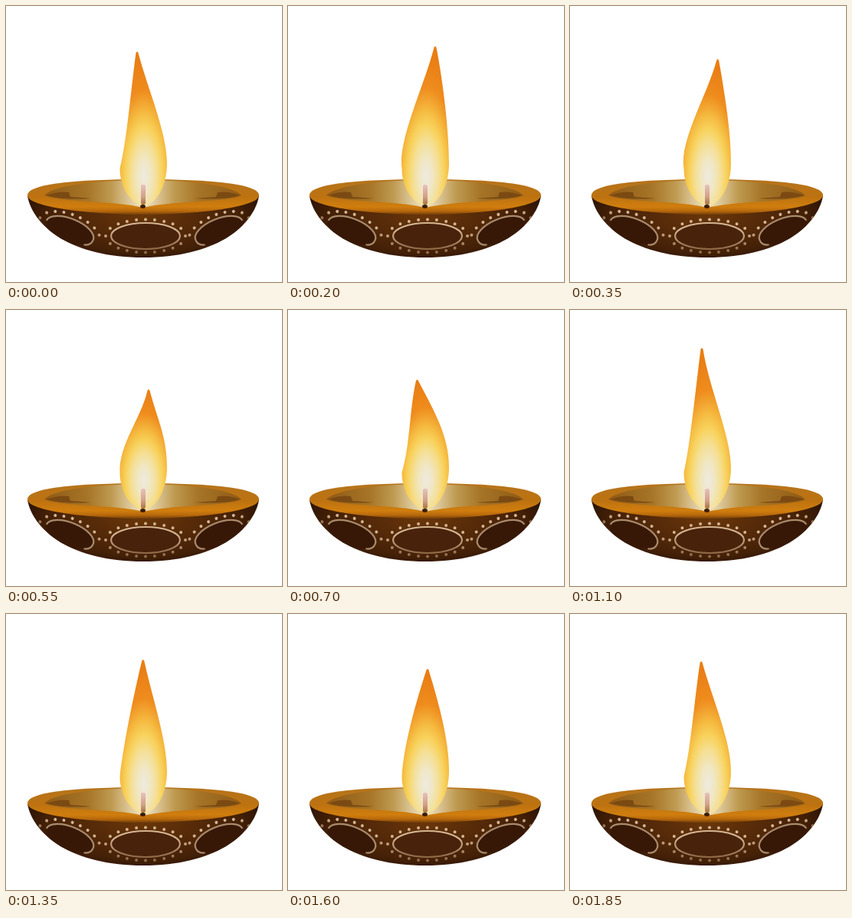
These frames come from a looping animation (360x360 px, 1.9 s). An HTML page:

```html
<!DOCTYPE html>
<html lang="en">
<head>
<meta charset="utf-8">
<title>Oil lamp</title>
<style>
  html, body { margin: 0; width: 100%; height: 100%; overflow: hidden; background: #fff; }
  svg { display: block; width: 100vw; height: 100vh; }
</style>
</head>
<body>
<svg viewBox="0 0 360 360">
  <defs>
    <radialGradient id="clay" gradientUnits="userSpaceOnUse" cx="0" cy="0" r="1"
      gradientTransform="translate(179 272) scale(158 62)">
      <stop offset="0" stop-color="#6a360a"/>
      <stop offset=".45" stop-color="#552a09"/>
      <stop offset=".8" stop-color="#432007"/>
      <stop offset="1" stop-color="#2c1305"/>
    </radialGradient>
    <linearGradient id="rim" x1="0" y1="0" x2="0" y2="1">
      <stop offset="0" stop-color="#b5741c"/>
      <stop offset=".5" stop-color="#bd7210"/>
      <stop offset=".78" stop-color="#d07e0e"/>
      <stop offset=".9" stop-color="#b8690c"/>
      <stop offset="1" stop-color="#75400a"/>
    </linearGradient>
    <linearGradient id="oil">
      <stop offset="0" stop-color="#8f5a14"/>
      <stop offset=".22" stop-color="#a67528"/>
      <stop offset=".34" stop-color="#be9a50"/>
      <stop offset=".43" stop-color="#dcc698"/>
      <stop offset=".5" stop-color="#efe4c8"/>
      <stop offset=".57" stop-color="#dcc698"/>
      <stop offset=".66" stop-color="#be9a50"/>
      <stop offset=".78" stop-color="#a67528"/>
      <stop offset="1" stop-color="#8f5a14"/>
    </linearGradient>
    <radialGradient id="fire" gradientUnits="userSpaceOnUse" cx="0" cy="0" r="1">
      <stop offset="0" stop-color="#eeeae0"/>
      <stop offset=".15" stop-color="#f0e7c4"/>
      <stop offset=".3" stop-color="#f5df94"/>
      <stop offset=".43" stop-color="#f8d25c"/>
      <stop offset=".55" stop-color="#f5ba40"/>
      <stop offset=".66" stop-color="#f19f2c"/>
      <stop offset=".74" stop-color="#ef8c1e"/>
      <stop offset="1" stop-color="#e97e14"/>
    </radialGradient>
    <radialGradient id="core">
      <stop offset="0" stop-color="#f4f4fc"/>
      <stop offset=".65" stop-color="#eeeef6" stop-opacity=".8"/>
      <stop offset="1" stop-color="#f2ecd8" stop-opacity="0"/>
    </radialGradient>
    <linearGradient id="wick" x1="0" y1="0" x2="0" y2="1">
      <stop offset="0" stop-color="#e6c2bc"/>
      <stop offset=".6" stop-color="#d3a08c"/>
      <stop offset="1" stop-color="#a87444"/>
    </linearGradient>
    <linearGradient id="ring" x1="0" y1="0" x2="0" y2="1">
      <stop offset=".3" stop-color="#d3b493"/>
      <stop offset="1" stop-color="#8f6848"/>
    </linearGradient>
    <clipPath id="inside"><use href="#body"/></clipPath>
  </defs>

  <path id="body" fill="url(#clay)" d="M28 248C36 289 87 328 179 328S322 289 330 248Z"/>
  <g id="ornament" stroke-width="2.2" clip-path="url(#inside)"></g>
  <path fill="url(#rim)" d="M28 247C28 232 90 226 179 226S330 232 330 247C330 262 250 272 179 272S28 262 28 247Z"/>
  <path fill="url(#oil)" d="M50 247C60 236 110 227 179 227S298 236 307 247C290 256 215 254 179 263C143 254 70 256 50 247Z"/>
  <g fill="#7b4a12">
    <path d="M53 247Q68 241 82 243L84 249L112 251Q72 253 53 247Z"/>
    <path d="M305 247Q290 241 276 243L274 249L246 251Q286 253 305 247Z"/>
  </g>

  <path id="flame" fill="url(#fire)"/>
  <ellipse id="core" cx="179.5" rx="11" fill="url(#core)"/>
  <rect x="176" y="233" width="6" height="26" rx="2.5" fill="url(#wick)"/>
  <ellipse cx="178.5" cy="261.5" rx="3.5" ry="2.5" fill="#3a1d08"/>
</svg>
<script>
const LOOP = 1900, STEP = 50;
const byId = id => document.getElementById(id);

// time, tip x, tip y, left bend x, right bend x
const poses = [
  [0, 171, 60, 163, 185],
  [200, 192, 53, 178, 203],
  [250, 194, 50, 179, 204],
  [550, 186, 104, 176, 197],
  [850, 154, 69, 143, 185],
  [1100, 172, 50, 164, 181],
  [1150, 174, 48, 165, 183],
  [1600, 182, 72, 166, 197]
];

function poseAt(i) {
  const n = poses.length, turn = Math.floor(i / n);
  const [t, ...values] = poses[i - turn * n];
  return [t + turn * LOOP, ...values];
}

// Hermite spline through the poses, closed over the loop
function sample(t) {
  let i = 0;
  while (poseAt(i + 1)[0] <= t) i++;
  const [a, b, c, d] = [-1, 0, 1, 2].map(k => poseAt(i + k));
  const span = c[0] - b[0], u = (t - b[0]) / span;
  return [1, 2, 3, 4].map(k => {
    const m0 = (c[k] - a[k]) / (c[0] - a[0]) * span;
    const m1 = (d[k] - b[k]) / (d[0] - b[0]) * span;
    return b[k] + u * (m0 + u * (3 * (c[k] - b[k]) - 2 * m0 - m1
      + u * (2 * (b[k] - c[k]) + m0 + m1)));
  });
}

function drawFlame(t) {
  const [x, y, left, right] = sample(t);
  const height = 262 - y, bend = y + height * 0.24;
  const sway = 150 + (182 - x) * 0.7;
  byId("flame").setAttribute("d",
    `M${x - 1.5} ${y + 1}Q${x} ${y - 2} ${x + 1.5} ${y + 1}` +
    `C${right} ${bend} 210 165 210 205` +
    "C210 236 196 258 179 262C163 257 148.5 238 148.5 212" +
    `C148.5 175 ${sway} 175 ${sway} 175`.replace(/.*/, "") +
    `C${sway} 175 ${left} ${bend} ${x - 1.5} ${y + 1}Z`);
  byId("fire").setAttribute("gradientTransform",
    `translate(180 222) scale(56 ${height * 0.75})`);
  const reach = 19 + height * 0.03;
  byId("core").setAttribute("cy", 246 - reach);
  byId("core").setAttribute("ry", reach);
}

// Evenly spaced round dots along a shape of the given dot count
const dotted = count => `pathLength="${count}" stroke-dasharray="0 1" stroke-linecap="round"
  stroke-width="4" fill="none" stroke="url(#ring)"`;

function drawOrnament() {
  const side = `<g transform="translate(83 293) rotate(22)">
    <ellipse rx="33" ry="15" fill="#371806"/>
    <path d="M-33 -1A33 15 0 0 1 33 0Q33 8 24 10" fill="none" stroke="#a98a6c"/>
    <path d="M-42 -1A42 21 0 0 1 42 1" ${dotted(9)}/></g>`;
  byId("ornament").innerHTML = side +
    `<g transform="translate(361 0) scale(-1 1)">${side}</g>
    <g transform="translate(182 300)">
      <ellipse rx="45" ry="17" fill="#48220a" stroke="url(#ring)"/>
      <ellipse rx="52" ry="21.5" ${dotted(20)}/></g>`;
}

const start = performance.now();

function frame() {
  const elapsed = (performance.now() - start) % LOOP;
  drawFlame(Math.floor(elapsed / STEP) * STEP);
  requestAnimationFrame(frame);
}

drawOrnament();
frame();
</script>
</body>
</html>
```
